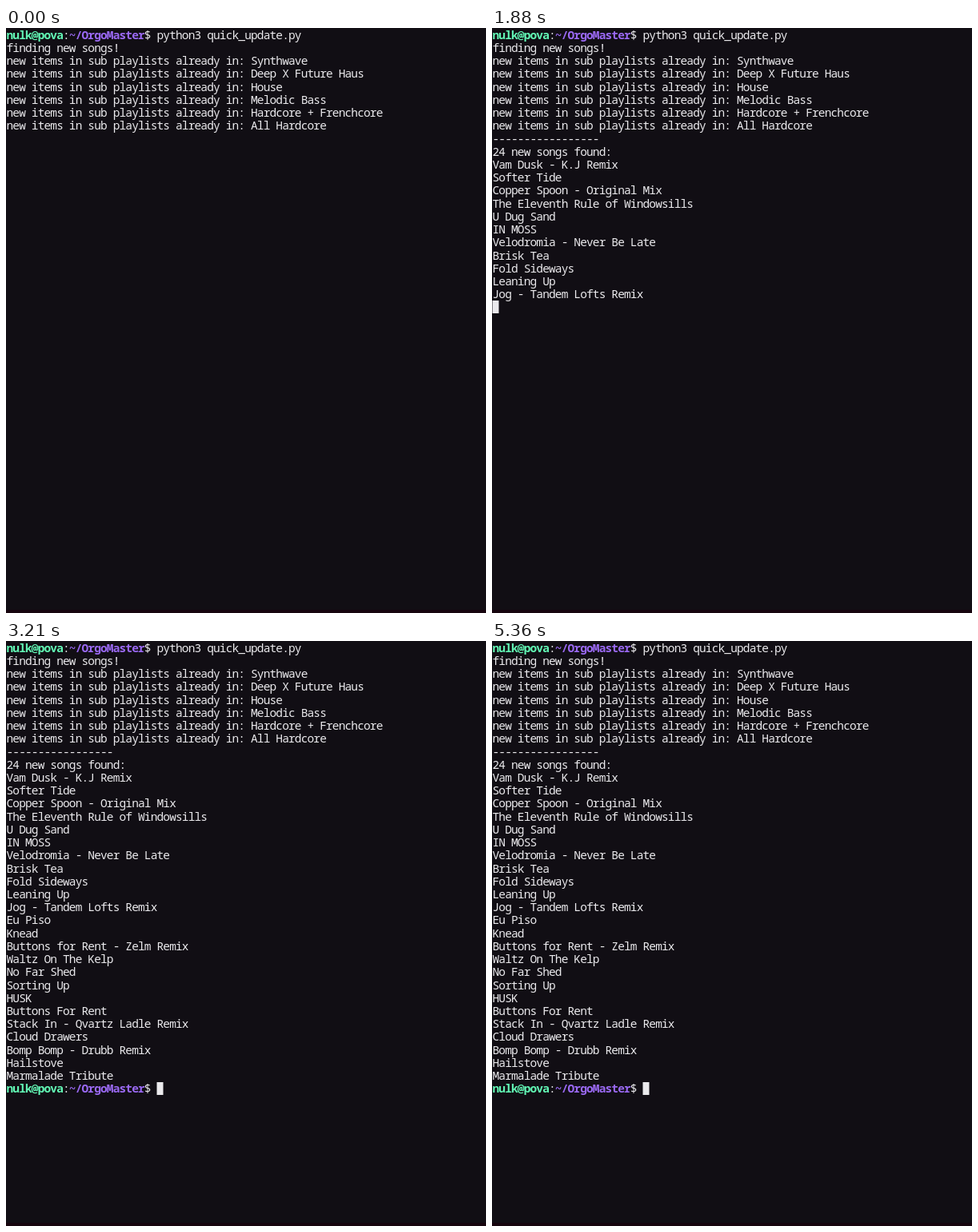
Write an HTML page with a canvas that moves like this. It is 600 by 732 pixels and loops after 5390 ms.

```html
<!DOCTYPE html>
<html lang="en">
<head>
<meta charset="utf-8">
<title>Playlist update</title>
<style>
  html, body { margin: 0; width: 100%; height: 100%; overflow: hidden; background: #110e14; }
  canvas { display: block; }
</style>
</head>
<body>
<canvas id="stage" width="600" height="732"></canvas>
<script>
const ctx = document.getElementById('stage').getContext('2d');
const LOOP = 5390, CELL = 7.834, ROW = 16.22, LEFT = 0.5, TOP = 0.5, BASELINE = 13.8;
const FONT = '14.5px "Noto Sans Mono", monospace';
const WHITE = '#ebeaed', GREEN = '#62f7b5', PURPLE = '#9a69f3';
const PROMPT_ROW = 34, PROMPT_TIME = 2970;

const playlists = ['Synthwave', 'Deep X Future Haus', 'House', 'Melodic Bass',
  'Hardcore + Frenchcore', 'All Hardcore'];
const songs = ['Vam Dusk - K.J Remix', 'Softer Tide', 'Copper Spoon - Original Mix',
  'The Eleventh Rule of Windowsills', 'U Dug Sand', 'IN MOSS',
  'Velodromia - Never Be Late', 'Brisk Tea', 'Fold Sideways', 'Leaning Up',
  'Jog - Tandem Lofts Remix', 'Eu Piso', 'Knead', 'Buttons for Rent - Zelm Remix',
  'Waltz On The Kelp', 'No Far Shed', 'Sorting Up', 'HUSK', 'Buttons For Rent',
  'Stack In - Qvartz Ladle Remix', 'Cloud Drawers', 'Bomp Bomp - Drubb Remix',
  'Hailstove', 'Marmalade Tribute'];
const lines = [
  'finding new songs!',
  ...playlists.map(name => 'new items in sub playlists already in: ' + name),
  '-----------------',
  songs.length + ' new songs found:',
  ...songs
];

// Output arrives in bursts: [first row, start time, ms per row]
const bursts = [[0, 0, 0], [8, 850, 0], [11, 930, 80], [14, 1240, 85],
  [21, 1940, 72], [27, 2382, 81.6], [33, 2880, 90]];

function printTime(row) {
  const [first, start, step] = bursts.findLast(b => b[0] <= row);
  return start + (row - first) * step;
}

function write(text, col, row, color = WHITE, weight = '') {
  ctx.font = weight + ' ' + FONT;
  ctx.letterSpacing = '0px';
  ctx.letterSpacing = CELL - ctx.measureText('0').width + 'px';
  ctx.fillStyle = color;
  ctx.fillText(text, LEFT + col * CELL, Math.round(BASELINE + row * ROW));
}

function prompt(row, command = '') {
  write('nulk@pova', 0, row, GREEN, 'bold');
  write(':', 9, row);
  write('~/OrgoMaster', 10, row, PURPLE, 'bold');
  write('$ ' + command, 22, row);
}

function cursorOn(t) {
  return t >= 4080 || (t >= 480 && (t - 480) % 1200 < 600);
}

function draw(t) {
  ctx.fillStyle = '#110e14';
  ctx.fillRect(0, 0, 600, 732);
  ctx.fillStyle = '#17050e';
  ctx.fillRect(0, 728, 600, 4);

  prompt(0, 'python3 quick_update.py');
  let row = 1;
  for (; row <= lines.length && t >= printTime(row); row++) write(lines[row - 1], 0, row);

  const done = t >= PROMPT_TIME;
  if (done) prompt(PROMPT_ROW);
  if (cursorOn(t)) {
    ctx.fillStyle = WHITE;
    ctx.fillRect(LEFT + (done ? 24 * CELL : 0), Math.round(TOP + row * ROW), 8, 16);
  }
}

const begin = performance.now();
function frame() {
  draw((performance.now() - begin) % LOOP);
  requestAnimationFrame(frame);
}
frame();
</script>
</body>
</html>
```
